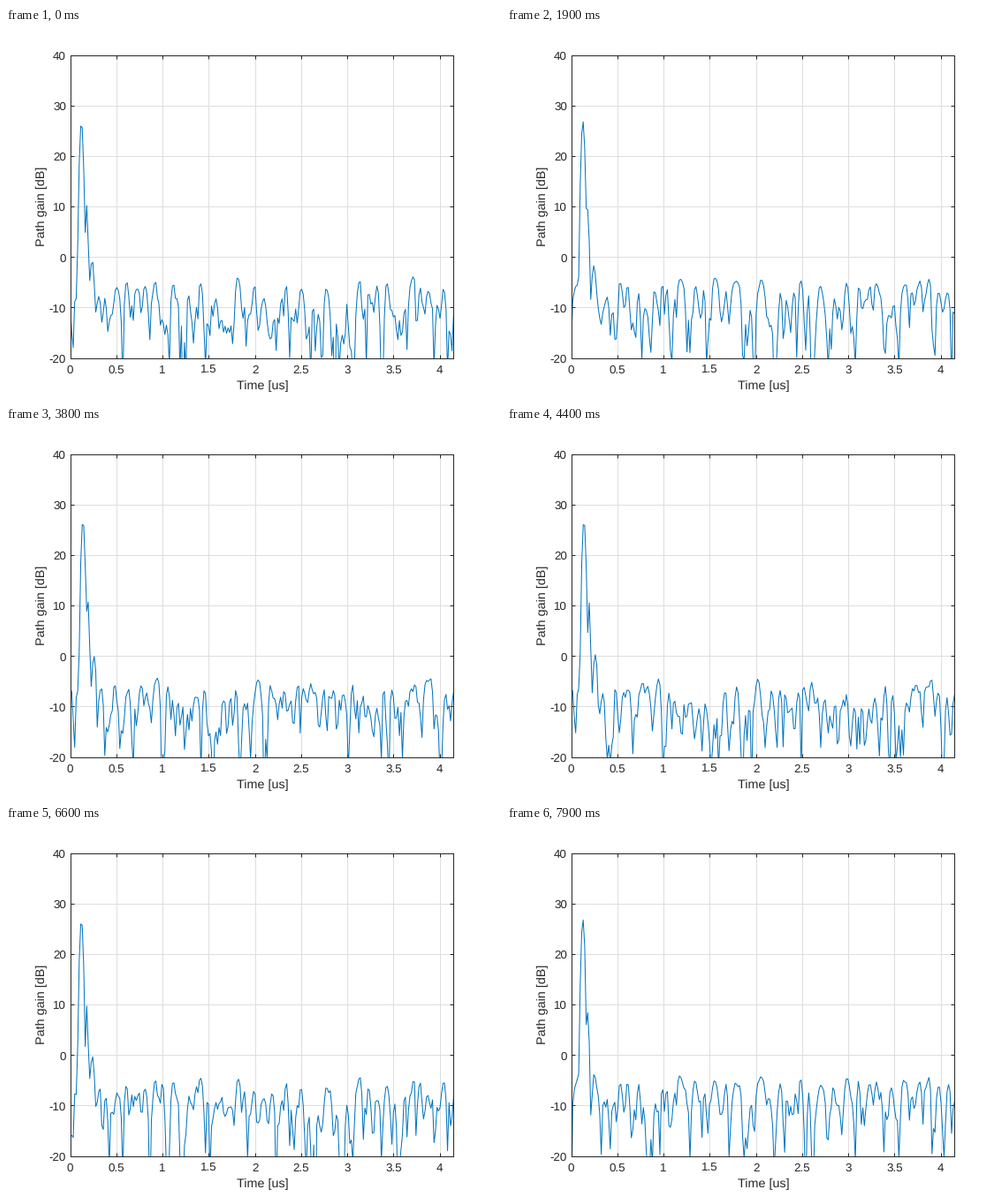
A matplotlib script that plays this animation: 560x420 px, repeating every 8 s.

```python
import numpy as np
import matplotlib.pyplot as plt
from matplotlib.animation import FuncAnimation

W, H, DPI = 560, 420, 100
FRAMES, INTERVAL = 80, 100
N, RATE = 256, 61.44  # samples, MHz
L, R, TOP, BOT = 72.62, 506.32, 31.15, 373.55
INK, BLUE = "#262626", "#0072BD"
PX = 72 / DPI

plt.rcParams["font.family"] = "Liberation Sans"
plt.rcParams["text.hinting"] = "none"
k = np.arange(N)
t = k / RATE


def smooth_noise(rng, rms, width):
    """Complex Gaussian noise, low-pass filtered to the given width."""
    x = np.arange(-8, 9)
    kernel = np.exp(-x**2 / (2 * width**2))
    kernel /= np.sqrt((kernel**2).sum())
    raw = rng.normal(size=(2, N + 16)) * rms / np.sqrt(2)
    return np.convolve(raw[0] + 1j * raw[1], kernel, "valid")


def lobe(x, db, drop):
    """Pulse that is a parabola on the dB scale."""
    return 10 ** ((db - drop * x**2) / 20)


def arrival(n):
    """Sub-sample delay of the main pulse, repeating every ten steps."""
    d = n % 10
    return 7.47 + (1 if d % 3 else .33 * (d % 2))


def gain(n):
    rng = np.random.default_rng(1000 + n)
    delay = arrival(n)
    steady = np.random.default_rng(int(delay * 100))
    z = smooth_noise(steady, .38, 1.1) + smooth_noise(rng, .12, .9)
    z *= .7 * np.tanh(np.abs(z) / .7) / np.abs(z)

    x = k - delay
    z += lobe(x, 26.9, 3.9)
    z += lobe(x - 3.3, 10.5, 6.5) * np.exp(1j * rng.uniform(1.6, 2.8))
    z += lobe(x - 7.2, -1.5, 3)
    return 20 * np.log10(np.abs(z) + 1e-6)


fig = plt.figure(figsize=(W / DPI, H / DPI), dpi=DPI, facecolor="white")
ax = fig.add_axes([L / W, 1 - BOT / H, (R - L) / W, (BOT - TOP) / H])
ax.set(xlim=(0, t[-1]), ylim=(-20, 40),
       xticks=np.arange(0, 4.1, .5), yticks=range(-20, 41, 10))
ax.set_axisbelow(True)
ax.grid(color="#dedede", lw=PX)
ax.tick_params(direction="in", top=True, right=True, length=4.3 * PX, width=PX,
               color=INK, labelbottom=False, labelleft=False)
for side in ax.spines.values():
    side.set(color=INK, linewidth=PX)


def label(x, y, s, px, **kw):
    kw = {"ha": "center", "va": "baseline", **kw}
    fig.text(x / W, 1 - y / H, s, size=px * PX, color=INK, **kw)


for v in ax.get_xticks():
    label(L + v / t[-1] * (R - L), 391, f"{v:g}", 13.33)
for v in ax.get_yticks():
    label(68, BOT - (v + 20) / 60 * (BOT - TOP) + 5, f"{v:g}", 13.33, ha="right")
label(290, 409, "Time [us]", 14.4)
label(44.5, 202.2, "Path gain [dB]", 14.4, rotation=90, rotation_mode="anchor")

line, = ax.plot(t, gain(0), color=BLUE, lw=PX)


def draw(n):
    line.set_ydata(gain(n))
    return line,


anim = FuncAnimation(fig, draw, frames=FRAMES, interval=INTERVAL,
                     repeat=True, repeat_delay=0)
plt.show()
```
